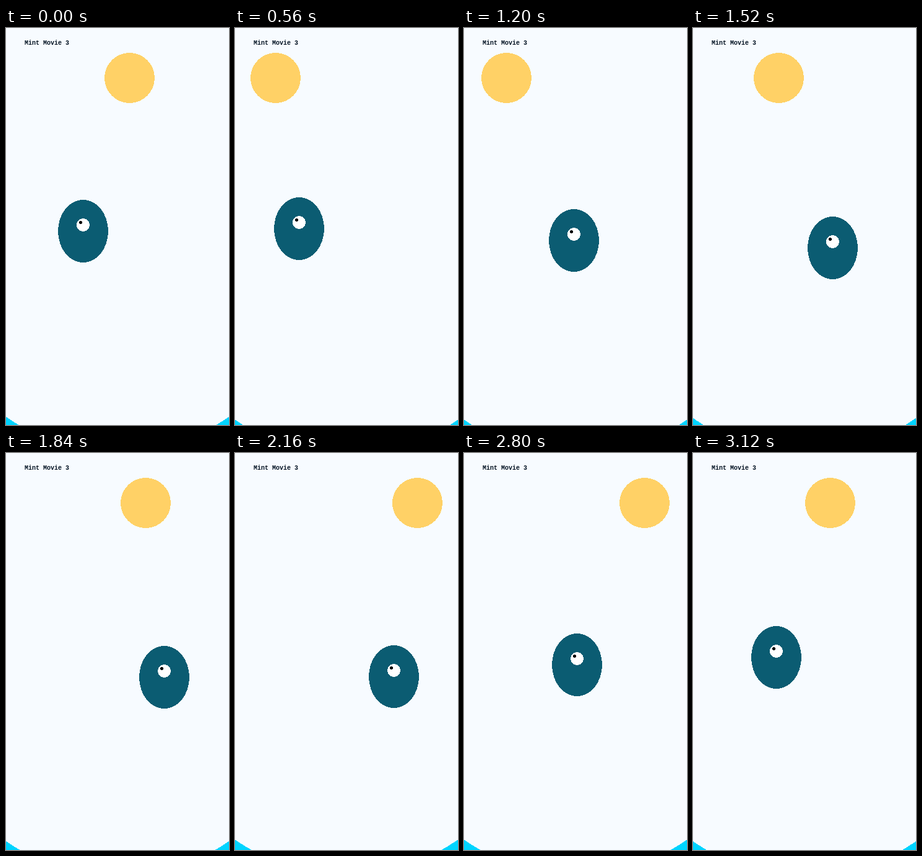
An HTML page for the animation above (3.2 s loop, 360 px wide and 640 px high).

```html
<!DOCTYPE html>
<html lang="en">
<head>
<meta charset="utf-8">
<title>Mint Movie 3</title>
<style>
  html, body { margin: 0; width: 100%; height: 100%; overflow: hidden; background: #f7fbff; }
  svg { display: block; width: 360px; height: 640px; }
  text { font: bold 10px "Liberation Mono", "Noto Sans Mono", monospace; fill: #001020; }
</style>
</head>
<body>
<svg viewBox="0 0 360 640" shape-rendering="crispEdges">
  <rect width="360" height="640" fill="#f7fbff"/>
  <rect y="610" width="360" height="30" fill="#00d4ff"/>
  <circle id="bowl" cx="180" r="314" fill="#f7fbff"/>
  <circle id="sun" cy="80.5" r="40.5" fill="#ffd166"/>
  <g id="blob">
    <ellipse rx="40.5" ry="50.5" fill="#0b5c72"/>
    <circle cy="-10" r="10.5" fill="#fff"/>
    <circle cx="-4" cy="-14" r="2.5" fill="#000"/>
  </g>
  <text x="30" y="27">Mint Movie 3</text>
</svg>
<script>
  const STEP = 80, STEPS = 40;
  const bowl = document.getElementById('bowl');
  const sun = document.getElementById('sun');
  const blob = document.getElementById('blob');

  // Whole-pixel position, taken at the pixel's centre
  const snap = v => Math.floor(v) + 0.5;

  function draw(now) {
    const step = Math.floor(now / STEP) % STEPS;
    const wave = phase => Math.sin(step / STEPS * 2 * Math.PI + phase);

    sun.setAttribute('cx', snap(180 + 140 * wave(3)));
    bowl.setAttribute('cy', 370 - 5 * wave(3));
    const x = snap(180 + 80 * wave(3.9));
    const y = snap(342 + 20 * wave(3.96));
    blob.setAttribute('transform', `translate(${x} ${y})`);
  }

  const start = performance.now();
  function tick() {
    draw(performance.now() - start);
    requestAnimationFrame(tick);
  }
  tick();
</script>
</body>
</html>
```
